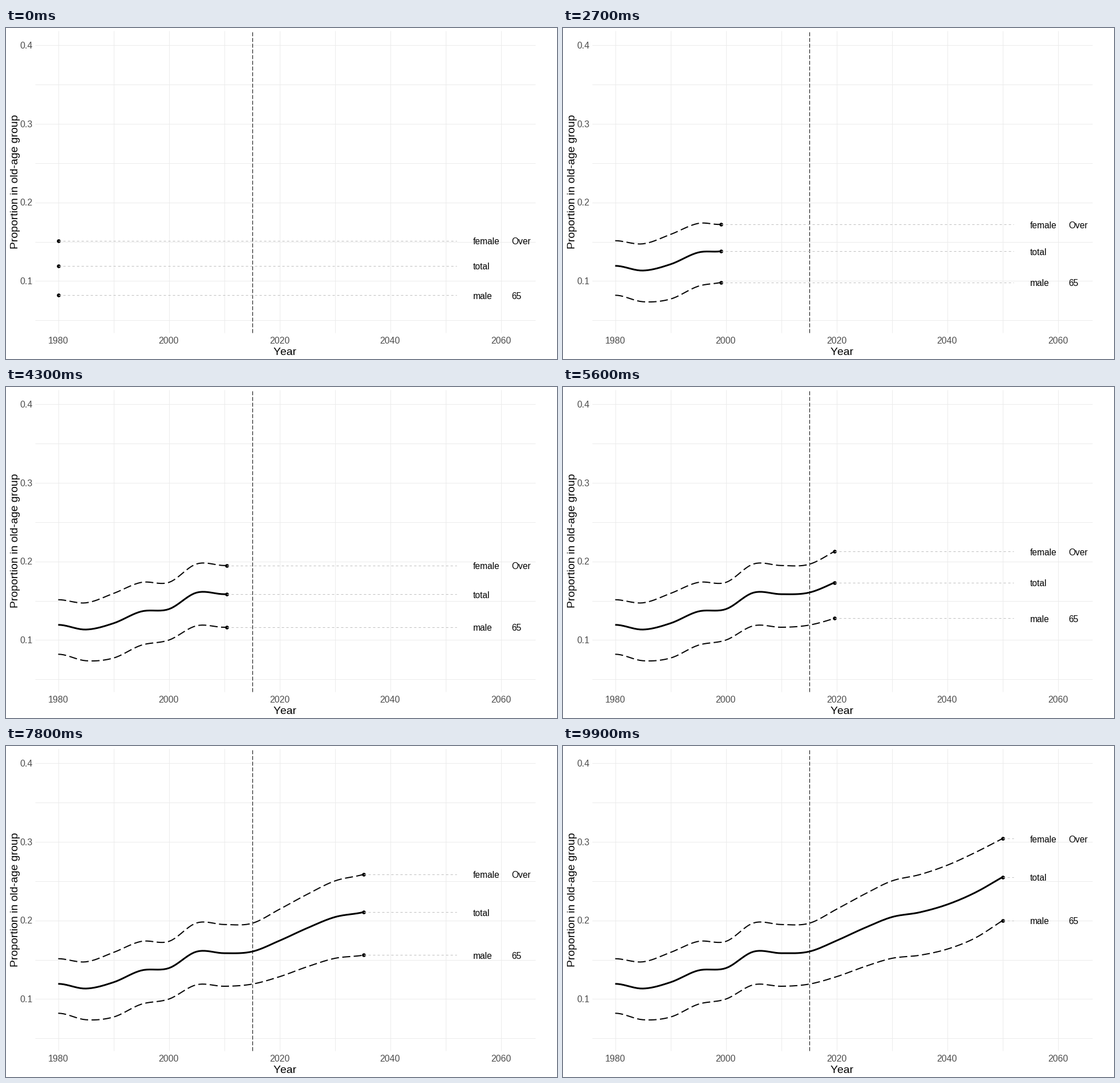
Animation of 966 by 580 pixels, one loop 10 s. Source, as a matplotlib script:

```python
import numpy as np
import matplotlib.pyplot as plt
from matplotlib.animation import FuncAnimation

W, H, DPI = 966, 580, 100
FRAMES = 100
PX = 72 / DPI  # points per pixel
LEFT, RIGHT, TOP, BOTTOM = 51, 928, 5, 534
GRID, TICK, GUIDE = "#EBEBEB", "#4D4D4D", "#BEBEBE"
LONGDASH = (0, (7, 3))
START, END, STEP = 1980, 2050, 5

plt.rcParams["font.family"] = "Liberation Sans"
plt.rcParams["text.kerning_factor"] = 6  # no pair kerning

# Percent over 65 every five years, and the lead of women over the total
TOTAL = [11.9, 11.3, 12.1, 13.6, 13.9, 16.0, 15.8, 16.0,
         17.4, 19.0, 20.4, 21.0, 22.0, 23.5, 25.5]
LEAD = [3.2, 3.4, 3.8, 3.7, 3.4, 3.65, 3.65, 3.6,
        4.0, 4.3, 4.6, 4.8, 5.0, 5.1, 4.9]


def x_of(year):
    return 91.5 + 9.705 * (year - START)


def y_of(share):
    return 442.9 - 1376.7 * (share - 0.1)


def mid(v):
    """Centre of the pixel that holds v."""
    return np.floor(v) + 0.5


def smooth(knots, year):
    """Cubic Hermite curve through five-yearly knots, level at the start."""
    p = np.asarray(knots)
    m = np.gradient(p)
    m[0] = 0
    s = (year - START) / STEP
    i = np.clip(s.astype(int), 0, len(p) - 2)
    u = s - i
    return ((1 + 2 * u) * (1 - u) ** 2 * p[i] + u * (1 - u) ** 2 * m[i]
            + u * u * (3 - 2 * u) * p[i + 1] + u * u * (u - 1) * m[i + 1])


def total(year):
    return smooth(TOTAL, year) / 100


def female(year):
    return total(year) + smooth(LEAD, year) / 100


def male(year):
    # men trail by slightly more than women lead, less so over time
    ratio = 1.17 - 0.04 * (year - START) / (END - START)
    return total(year) - ratio * smooth(LEAD, year) / 100


fig = plt.figure(figsize=(W / DPI, H / DPI), dpi=DPI, facecolor="white")
ax = fig.add_axes([0, 0, 1, 1])
ax.set(xlim=(0, W), ylim=(H, 0))
ax.axis("off")


def stroke(xs, ys, width, color="black", **kw):
    return ax.plot(xs, ys, color=color, lw=width * PX,
                   solid_capstyle="butt", dash_capstyle="butt", **kw)[0]


def label(x, y, s, size, color="black", **kw):
    return ax.text(x, y, s, fontsize=size * PX, color=color,
                   va="baseline", **kw)


for share in np.arange(0.05, 0.41, 0.05):
    y = mid(y_of(share))
    stroke([LEFT, RIGHT], [y, y], 1, GRID, zorder=1)
for year in range(1980, 2061, 10):
    x = mid(x_of(year))
    stroke([x, x], [BOTTOM, TOP], 1, GRID, zorder=1)

for share in (0.1, 0.2, 0.3, 0.4):
    label(46.5, y_of(share) + 6.2, f"{share:.1f}", 16, TICK, ha="right")
for year in range(1980, 2061, 20):
    label(x_of(year) - 0.3, 553, str(year), 16, TICK, ha="center")
label(488.7, 573, "Year", 19.4, ha="center")
label(21, 269.5, "Proportion in old-age group", 19.4, ha="center",
      rotation=90, rotation_mode="anchor")

now = mid(x_of(2015))
stroke([now, now], [BOTTOM, TOP], 1, linestyle=LONGDASH, zorder=2)


class Series:
    def __init__(self, share, name, note="", width=2, style=LONGDASH):
        self.share = share
        self.line = stroke([], [], width, linestyle=style, zorder=3)
        self.dot = ax.plot([], [], "o", color="black", ms=6.6 * PX, mew=0,
                           zorder=4)[0]
        self.guide = stroke([], [], 1, GUIDE, linestyle=(0, (4, 4)), zorder=5)
        self.texts = [label(819, 0, name, 15.6), label(886.3, 0, note, 15.6)]

    def show(self, year):
        t = np.append(np.arange(START, year, 0.5), year)
        x, y = x_of(t), y_of(self.share(t))
        self.line.set_data(x, y)
        self.dot.set_data(x[-1:], y[-1:])
        self.guide.set_data([x[-1], x_of(2052)], [y[-1], y[-1]])
        for text in self.texts:
            text.set_y(y[-1] + 6.5)


series = [
    Series(female, "female", "Over"),
    Series(total, "total", width=3, style="-"),
    Series(male, "male", "65"),
]


def update(i):
    year = START + (END - START) * i / (FRAMES - 1)
    for s in series:
        s.show(year)


anim = FuncAnimation(fig, update, frames=FRAMES, interval=100,
                     repeat=True, repeat_delay=0, blit=False)
plt.show()
```
